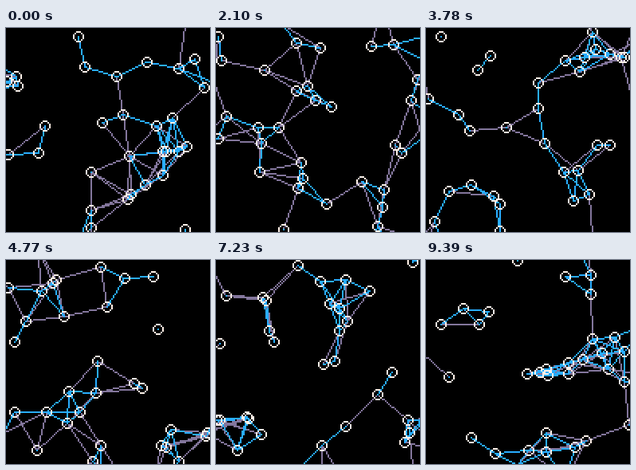
Write an HTML page with a canvas that moves like this. It is 256 by 256 pixels and loops after 9420 ms.

```html
<!DOCTYPE html>
<html>
<head>
<meta charset="utf-8">
<style>
html, body { margin: 0; height: 100%; overflow: hidden; background: #000; }
canvas { display: block; width: 100vw; height: 100vh; image-rendering: pixelated; }
</style>
</head>
<body>
<canvas id="stage" width="128" height="128"></canvas>
<script>
const SIZE = 128, STEP = 30, FRAMES = 314;
const NEAR = 22.4, FAR = 30;
const BLUE = '#29adff', MAUVE = '#83769c', WHITE = '#fff1e8';

// Start x, y and total drift x, y over one loop, in half cells
const points = [
  [3, 159, 502, 762], [13, 61, -296, 844], [15, 73, 192, -822],
  [217, 51, 68, -672], [227, 149, -426, 586], [217, 155, 126, 856],
  [107, 251, -1002, 1012], [209, 113, -1082, -408], [197, 155, 722, -938],
  [225, 253, -550, -1042], [147, 109, -202, -138], [177, 43, 78, -92],
  [0, 66, -1129, 327], [249, 75, 512, -728], [157, 208, -1200, 657],
  [175, 197, -222, 670], [107, 181, -422, -312], [49, 123, 130, 6],
  [237, 39, -58, -664], [107, 229, -466, 171], [153, 215, 730, -726],
  [139, 61, -632, 20], [41, 157, -506, 160], [189, 123, 786, -848],
  [99, 49, 492, 784], [200, 155, 487, -134], [91, 11, -24, -1210],
  [197, 185, -1078, -1068], [155, 161, -446, 1236], [121, 119, -506, 792]
];

const ctx = document.getElementById('stage').getContext('2d');
const wrap = v => ((v % SIZE) + SIZE) % SIZE;
// Shortest signed distance on the torus
const gap = (a, b) => wrap(b - a + SIZE / 2) - SIZE / 2;
const dot = (x, y) => ctx.fillRect(x, y, 1, 1);

function line(x, y, dx, dy) {
  const n = Math.max(Math.abs(dx), Math.abs(dy));
  for (let i = 0; i <= n; i++) {
    const k = n ? i / n : 0;
    dot(x + Math.round(dx * k), y + Math.round(dy * k));
  }
}

function ring(x, y, r) {
  for (let i = -r; i <= r; i++)
    for (let j = -r; j <= r; j++)
      if (Math.round(Math.hypot(i, j)) === r) dot(x + i, y + j);
}

function draw(frame) {
  const k = frame / (FRAMES - 1);
  const spots = points.map(([x, y, dx, dy]) =>
    [Math.floor(wrap((x + dx * k) / 2)), Math.floor(wrap((y + dy * k) / 2))]);
  ctx.fillStyle = '#000';
  ctx.fillRect(0, 0, SIZE, SIZE);
  const links = [];
  spots.forEach(([x, y], i) => {
    for (const [u, v] of spots.slice(i)) {
      const dx = gap(x, u), dy = gap(y, v), d = Math.hypot(dx, dy);
      if (d < FAR) links.push([d, x, y, dx, dy]);
    }
  });
  for (const [d, ...seg] of links.sort((a, b) => b[0] - a[0])) {
    ctx.fillStyle = d < NEAR ? BLUE : MAUVE;
    line(...seg);
  }
  ctx.fillStyle = WHITE;
  for (const [x, y] of spots) ring(x, y, 3);
}

const start = performance.now();
function tick() {
  draw(Math.floor((performance.now() - start) / STEP) % FRAMES);
  requestAnimationFrame(tick);
}
tick();
</script>
</body>
</html>
```
